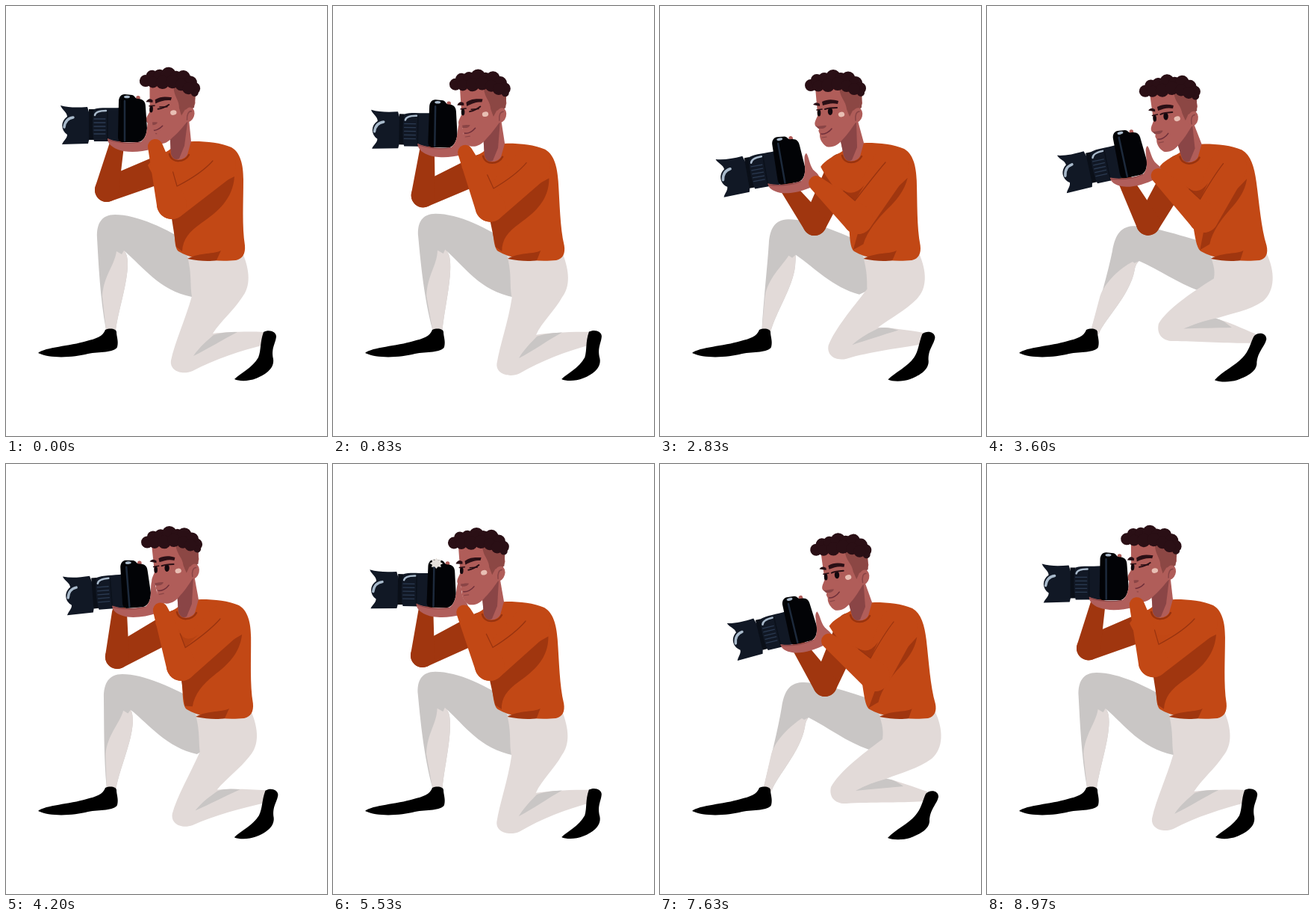
An HTML page with a canvas for the animation above (9.01 s loop, 430 by 575 pixels).

```html
<!DOCTYPE html>
<html lang="en">
<head>
<meta charset="utf-8">
<title>Photographer</title>
<style>
html, body { margin: 0; width: 100%; height: 100%; overflow: hidden; background: #fff; }
canvas { display: block; width: 430px; height: 575px; }
</style>
</head>
<body>
<canvas id="stage"></canvas>
<script>
const canvas = document.getElementById('stage');
const g = canvas.getContext('2d');
const scale = window.devicePixelRatio || 1;
canvas.width = 430 * scale;
canvas.height = 575 * scale;

const LOOP = 9010, CYCLE = LOOP / 2;
const SHIRT = '#c24815', SHIRT_DARK = '#a0360f', CREASE = '#98330f';
const SKIN = '#b05d59', SKIN_DARK = '#8a4546', HAND = '#b05e5b', HAIR = '#2a0f15';
const CLOTH = '#e2dad8', CLOTH_DARK = '#c9c6c5';
const BLACK = '#020306', LENS = '#111825', SHINE = '#a9bacb';

// time, hip, collar, lift, head x y angle, camera x y angle, near elbow x y, far elbow x y, far wrist
const poses = [
  [0,    0,   0,   0,  220, 100, 5,    169, 150, 0,     222, 265,  135, 246,  -21],
  [1025, -10, -19, 3,  195, 103, 1,    145, 160, 1,     210, 270,  120, 256,  -20],
  [1670, -7,  -13, 3,  202, 104, 2,    148, 175, 0,     222, 278,  134, 270,  -19],
  [2250, 7,   2,   -7, 211, 91,  1,    151, 194, -4,    239, 278,  167, 281,  -14],
  [2830, 29,  25,  2,  235, 103, 0,    172, 205, -10,   265, 285,  207, 291,  -8],
  [3125, 50,  36,  4,  242, 110, -3,   187, 207, -13.5, 288, 284,  221, 295,  -9],
  [3450, 60,  42,  4,  247, 110, -3,   193, 202, -13,   295, 284,  222, 294,  -11],
  [4200, 11,  10,  0,  222, 101, -1,   173, 160, -4.5,  235, 270,  149, 258,  -24]
];

// Each shape is blended between an upright and a seated outline.
const legs = {
  far: [
    'M250,320 C215,297 175,279 146,279 C128,279 121,291 122,310 C124,345 126,390 134,433 L147,433 C151,405 163,370 163,345 C163,335 161,330 158,327 C185,350 205,380 249,389 L270,375 L262,330 Z',
    'M300,320 C255,306 215,291 190,292 C172,293 166,306 163,325 C158,355 148,395 138,436 L149,438 C158,415 188,385 194,352 C195,345 197,341 199,339 C225,352 250,372 280,382 L310,372 L310,345 Z'],
  shin: [
    'M148,328 C145,348 131,360 129,388 L134,433 L147,433 C151,405 163,370 163,345 C163,335 161,330 158,327 L155,332 Z',
    'M190,340 C175,350 155,368 149,388 L138,436 L149,438 C158,415 188,385 194,352 C195,345 197,341 199,339 L193,342 Z'],
  near: [
    'M317,330 C327,355 328,375 316,390 C305,407 287,422 277,438 C295,436 320,435 346,436 L346,453 C315,461 280,472 250,488 C236,494 219,488 221,474 C226,450 240,420 249,388 C246,370 250,355 240,325 Z',
    'M368,330 C380,355 380,380 364,394 C345,408 325,412 303,421 C320,424 340,432 358,438 L357,451 C330,453 280,452 250,454 C234,455 226,445 229,432 C240,412 268,390 298,368 C300,355 297,345 290,325 Z'],
  shade: [
    'M251,468 C260,455 270,447 278,440 C290,436 300,436 310,436 C290,446 270,459 251,468 Z',
    'M262,437 C275,430 288,425 303,421 C310,421 318,425 326,431 C305,433 280,435 262,437 Z'],
  foot: [
    'M345,436 C352,432 362,435 362,442 C361,452 355,457 358,472 C360,486 345,494 335,498 C325,502 312,502 306,499 C314,491 330,484 338,470 C342,460 340,450 345,436 Z',
    'M356,441 C361,435 373,436 373,445 C371,455 361,462 361,478 C360,490 345,496 335,500 C325,503 312,503 305,500 C315,489 333,481 342,470 C350,461 351,452 356,441 Z']
};
const underArm = [
  'M306,228 C304,258 284,275 262,290 C245,302 237,312 236,328 L228,322 ',
  'M306,228 C301,246 290,258 278,270 C266,282 250,300 244,318 L230,326 '
];

const fill = (d, color) => { g.fillStyle = color; g.fill(new Path2D(d)); };
const line = (d, color, width) => {
  g.strokeStyle = color;
  g.lineWidth = width;
  g.stroke(new Path2D(d));
};
const oval = (x, y, rx, ry, color, turn = 0) => {
  g.fillStyle = color;
  g.beginPath();
  g.ellipse(x, y, rx, ry, turn, 0, 7);
  g.fill();
};
const warp = (d, fn) => d.replace(/(-?[\d.]+),(-?[\d.]+)/g, (_, x, y) => fn(+x, +y).join());
const numbers = d => d.match(/-?[\d.]+/g).map(Number);
const blend = ([a, b], fx, fy = fx) => {
  const end = numbers(b);
  let i = 0;
  return a.replace(/-?[\d.]+/g, n => {
    const f = i % 2 ? fy : fx;
    return +n + (end[i++] - n) * f;
  });
};

// Tapered capsule around two circles.
function limb([x1, y1], r1, [x2, y2], r2, color) {
  const a = Math.atan2(y2 - y1, x2 - x1);
  const b = Math.acos((r1 - r2) / Math.hypot(x2 - x1, y2 - y1));
  g.fillStyle = color;
  g.beginPath();
  g.arc(x1, y1, r1, a + b, a - b + 2 * Math.PI);
  g.arc(x2, y2, r2, a - b, a + b);
  g.fill();
}

const place = (x, y, deg, ox, oy) => (px, py) => {
  const a = deg * Math.PI / 180, c = Math.cos(a), s = Math.sin(a);
  return [x + (px - ox) * c - (py - oy) * s, y + (px - ox) * s + (py - oy) * c];
};
function within(x, y, deg, ox, oy, draw) {
  g.save();
  g.translate(x, y);
  g.rotate(deg * Math.PI / 180);
  g.translate(-ox, -oy);
  draw();
  g.restore();
}

// Periodic cubic through the poses, flat at turning points.
function poseAt(t) {
  const n = poses.length;
  const key = i => {
    const k = (i + n) % n;
    return { p: poses[k], t: poses[k][0] + Math.floor(i / n) * CYCLE };
  };
  let i = n - 1;
  while (poses[i][0] > t) i--;
  const [a, b, c, d] = [key(i - 1), key(i), key(i + 1), key(i + 2)];
  const h = c.t - b.t, f = (t - b.t) / h;
  const slope = (l, m, r, j) => {
    const s1 = (m.p[j] - l.p[j]) / (m.t - l.t), s2 = (r.p[j] - m.p[j]) / (r.t - m.t);
    return s1 * s2 <= 0 ? 0 : 2 * s1 * s2 / (s1 + s2);
  };
  return b.p.map((v, j) => j === 0 ? t :
    v * (1 + 2 * f) * (1 - f) ** 2 + c.p[j] * f * f * (3 - 2 * f) +
    h * f * (1 - f) * (slope(a, b, c, j) * (1 - f) - slope(b, c, d, j) * f));
}

function drawHair() {
  fill('M199,106 C205,92 255,88 270,106 L270,114 C250,108 225,108 203,109 Z', HAIR);
  const curls = [
    [202, 106, 8], [210, 99, 8], [220, 97, 8], [232, 95, 10], [242, 97, 8], [252, 97, 9.5], [262, 103, 9],
    [268, 110, 8], [269, 116, 5], [212, 107, 7.5], [225, 106, 9], [238, 104, 9], [250, 107, 8], [260, 111, 8]
  ];
  for (const [x, y, r] of curls) oval(x, y, r, r, HAIR);
}

function drawHead(wink) {
  fill('M208,108 C209,124 211,138 211,147 C209,152 206,156 208,160 C210,162 213,162 213,165 C211,168 215,170 214,173 C214,178 217,184 223,188 C231,190 239,186 245,178 C253,170 259,160 262,156 L271,130 L268,108 Z', SKIN);
  fill('M240,108 C241,124 249,126 250,138 L254,148 L258,140 L270,136 L271,108 Z', '#8c4744');
  oval(264, 146, 7, 10, SKIN, .25);
  line('M262,153 C261,146 263,141 267,141', SKIN_DARK, 1.5);
  fill('M208,160 C213,162 217,159 223,160 C221,165 215,164 212,164 Z', SKIN_DARK);
  line('M216,171 C221,172 227,168 230,164', '#6f2f3a', 1.5);
  line('M217,176 L223,175', SKIN_DARK, 1.2);
  const drop = 2 * wink;
  fill(`M205,${132 + drop} C208,128 211,129 214,131 L214,134 Z`, HAIR);
  fill(`M217,${128 + drop} C225,124 232,125 239,${127 - drop} L238,${131 - drop} C230,129 225,131 218,${133 + drop} Z`, HAIR);
  oval(213, 143, 2.3, 4.5, '#12080d');
  line('M210,139 L217,138', HAIR, 1.5);
  if (wink > .5) {
    line('M222,142 C227,141 231,139 236,135', HAIR, 2);
    line('M224,139 L234,138', HAIR, 1.5);
  } else {
    oval(228, 141, 3.2, 5 - 4 * wink, '#12080d');
    line('M221,138 C226,136 231,136 237,136', HAIR, 2);
  }
  oval(243, 145, 4.2, 3.3, '#e8bfb4', -.2);
  drawHair();
}

function drawCamera(flash) {
  fill('M73,133 C84,136 95,136 109,135 L112,145 L112,176 L110,184 L75,185 C77,180 82,177 82,172 C73,166 73,154 82,148 C82,142 75,139 73,133 Z', LENS);
  line('M78,162 C79,154 83,150 90,149', SHINE, 3.5);
  fill('M111,138 H118 V179 H111 Z', '#0a0f18');
  fill('M118,138 C127,135 140,137 154,136 L154,181 L118,181 C115,168 115,149 118,138 Z', LENS);
  for (let y = 151; y < 176; y += 5) line(`M118,${y} H133`, '#2b3a51', 1.3);
  line('M136,141 V180', '#0b111b', 1.5);
  line('M119,146 C120,141 126,140 134,140', SHINE, 2.5);
  oval(177, 123, 2.8, 3, SKIN);
  fill('M151,128 C151,122 154,118 159,118 L169,119 C173,120 173,124 176,124 C184,124 187,128 187,135 L189,164 C188,174 184,181 177,182 L155,182 C152,182 150,179 150,175 Z', BLACK);
  line('M159,127 L159,180', '#1d2a3c', 2.5);
  oval(162, 121.5, 4, 1.8, SHINE);
  if (flash > 0) {
    g.fillStyle = '#e6e1dc';
    g.beginPath();
    for (let i = 0; i < 16; i++) {
      const r = (i % 2 ? 6 : 9) * flash, a = i * Math.PI / 8;
      g.lineTo(162 + r * Math.cos(a), 123 + r * .8 * Math.sin(a));
    }
    g.fill();
  }
}

function drawHand() {
  fill('M136,177 C150,183 165,183 180,182 C186,178 188,172 189,163 C190,155 190,148 194,146 C197,152 195,165 201,172 C209,181 207,189 196,191 C180,196 160,196 150,192 C140,188 136,183 136,177 Z', HAND);
  line('M137,179 C150,183 165,185 180,182', SKIN_DARK, 1.2);
}

const ramp = (t, a, b) => Math.min(1, Math.max(0, (t - a) / (b - a)));

function draw(t) {
  const [, hip, collar, lift, hx, hy, hr, cx, cy, cr, nx, ny, fx, fy, wristX] = poseAt(t);
  const wink = t < 2500 ? 1 - ramp(t, 1200, 1330) : ramp(t, 4300, 4420);
  const flash = Math.min(ramp(t, 920, 990), 1 - ramp(t, 1060, 1140));
  const seated = ramp(hip, 0, 30);
  const torso = (x, y) => {
    const k = Math.min(1, (331 - y) / 123);
    return [x + hip + (collar - hip) * k, y + Math.max(0, k) * lift];
  };
  const cloth = d => warp(d, torso);
  const head = place(hx, hy, hr, 235, 103);
  const cam = place(cx, cy, cr, 0, 0);
  const leg = name => blend(legs[name], hip / 50, (.42 * hip + .006 * hip * hip) / 36);

  g.setTransform(scale, 0, 0, scale, 0, 0);
  g.fillStyle = '#fff';
  g.fillRect(0, 0, 430, 575);
  g.lineCap = g.lineJoin = 'round';

  fill(leg('far'), CLOTH_DARK);
  fill(leg('shin'), CLOTH);
  fill('M133,433 C140,430 148,432 148,436 C148,442 151,448 149,456 C145,464 125,462 110,465 C90,470 60,472 43,464 C53,456 85,455 108,448 C120,445 130,442 133,433 Z', '#000');

  const farElbow = [fx, fy];
  limb(farElbow, 16, torso(218, 214), 19, SHIRT_DARK);
  limb(farElbow, 16, cam(wristX, 37), 10, SHIRT_DARK);

  fill(leg('near'), CLOTH);
  fill(leg('shade'), CLOTH_DARK);
  fill(leg('foot'), '#000');

  fill(cloth('M218,193 C225,187 238,181 252,181 C270,181 288,183 302,189 C314,196 318,212 318,232 C318,262 316,295 320,320 C321,331 317,338 308,340 C285,342 250,340 231,328 C224,322 227,300 224,280 C222,255 200,235 190,213 C196,204 208,199 218,193 Z'), SHIRT);
  const elbow = [nx, ny], shoulder = torso(283, 212), wrist = cam(31, 38);
  fill(cloth(blend(underArm, seated)) + `L${nx},${ny + 19} L${nx + 8},${ny} Z`, SHIRT_DARK);
  fill(cloth('M288,327 C280,332 260,329 243,338 C258,341 272,342 282,340 Z'), SHIRT_DARK);

  const [jaw, nape] = [head(241, 176), head(264, 150)];
  const neck = cloth('L221,198 C224,209 238,207 243,199 L248,181 ');
  fill(`M${jaw} ${neck}L${nape} Z`, SKIN);
  fill(`M${head(263, 155)} L${jaw} ${cloth('L221,198 C224,206 228,206 232,204 L239,187')} Z`, SKIN_DARK);
  line(cloth('M219,198 C222,211 240,209 245,199'), CREASE, 2.5);
  within(hx, hy, hr, 235, 103, () => drawHead(wink));

  within(cx, cy, cr, 169, 150, () => {
    drawCamera(flash);
    drawHand();
  });

  limb(elbow, 20, shoulder, 25, SHIRT);
  limb(elbow, 20, wrist, 10, SHIRT);

  // Fold at the inside of the near elbow.
  const unit = ([x, y]) => {
    const d = Math.hypot(x - nx, y - ny);
    return [(x - nx) / d, (y - ny) / d];
  };
  const [a, b] = [unit(wrist), unit(shoulder)];
  const len = Math.hypot(a[0] + b[0], a[1] + b[1]);
  const fold = [nx + 25 * (a[0] + b[0]) / len, ny + 25 * (a[1] + b[1]) / len];
  const along = (v, d) => [fold[0] + v[0] * d, fold[1] + v[1] * d];
  g.globalAlpha = seated;
  fill(`M${fold} L${along(a, 26)} Q${along(a, 4)} ${along(b, 24)} Z`, SHIRT_DARK);
  g.globalAlpha = 1;
  line(`M${torso(277, 207)} Q${torso(262, 224)} ${fold} L${along(a, 20)}`, CREASE, 1.2);
}

function tick() {
  draw(performance.now() % LOOP % CYCLE);
  requestAnimationFrame(tick);
}
tick();
</script>
</body>
</html>
```
